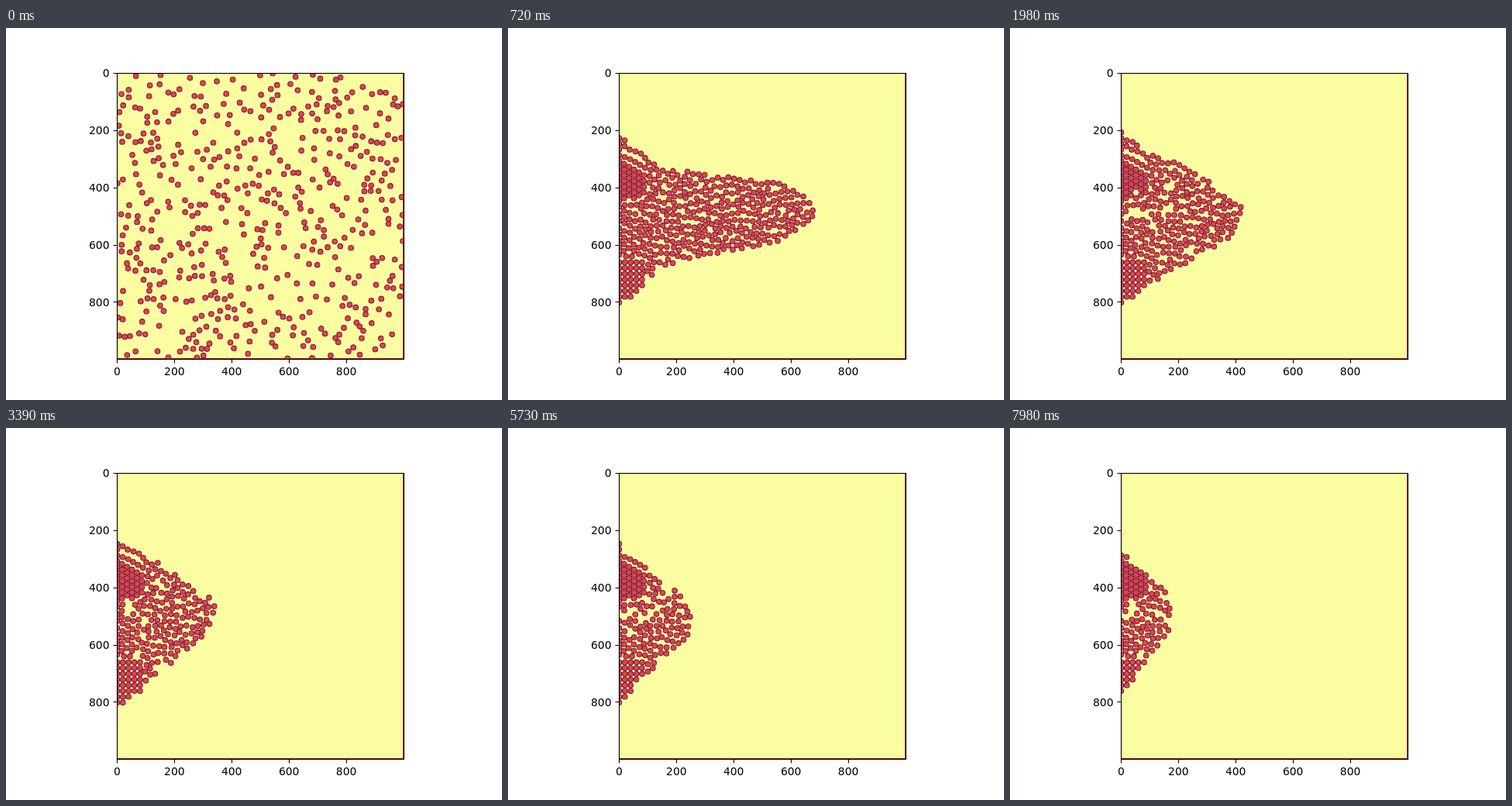
An HTML page that plays this animation: 640x480 px, repeating every 8 s.

```html
<!DOCTYPE html>
<html lang="en">
<head>
<meta charset="utf-8">
<title>Crowd leaving through a door</title>
<style>
  html, body { margin: 0; width: 100%; height: 100%; overflow: hidden; background: #fff; }
  svg { display: block; width: 640px; height: 480px; }
  text { font: 13.89px "DejaVu Sans", sans-serif; }
</style>
</head>
<body>
<svg viewBox="0 0 640 480">
  <defs><clipPath id="room"><rect x="143.5" y="58.5" width="370" height="369"/></clipPath></defs>
  <rect x="143.5" y="58.5" width="370" height="369" fill="#fbfda1"/>
  <path d="M512.5 58V426.5H143" fill="none" stroke="#b01822"/>
  <path id="crowd" clip-path="url(#room)" fill="#e04a38" stroke="#7a1a58" stroke-width="1.1"/>
  <rect x="143.5" y="58.5" width="370" height="369" fill="none" stroke="#000" stroke-width="1.11"/>
  <g id="axes"></g>
</svg>
<script>
const LOOP = 8000, STEP = 30, SETTLED = 24, PEOPLE = 500;
const PACE = 20, DOOR = 500, SCALE = 0.3696, LEFT = 143.2, TOP = 57.6;

// Queue outline: step, length, then upper and lower edge at six even places along it
const OUTLINE = [
  [24, 682, [222, 320, 345, 370, 380, 450], [820, 690, 640, 618, 592, 510]],
  [66, 422, [205, 278, 303, 340, 400, 470], [818, 745, 697, 650, 607, 540]],
  [113, 350, [245, 275, 310, 360, 415, 450], [818, 772, 702, 655, 590, 490]],
  [148, 294, [245, 270, 318, 370, 405, 460], [818, 772, 722, 665, 605, 542]],
  [191, 254, [245, 280, 330, 388, 413, 490], [818, 748, 702, 645, 610, 555]],
  [266, 180, [270, 305, 330, 380, 402, 460], [780, 727, 685, 635, 600, 555]]
];

let seed = 20;
function rand() {
  seed = (seed + 0x6D2B79F5) | 0;
  let t = Math.imul(seed ^ (seed >>> 15), 1 | seed);
  t = (t + Math.imul(t ^ (t >>> 7), 61 | t)) ^ t;
  return ((t ^ (t >>> 14)) >>> 0) / 4294967296;
}
const mix = (a, b, f) => a + (b - a) * f;
const clamp = (v, limit) => Math.max(-limit, Math.min(limit, v));
const reach = p => Math.max(p.x, Math.abs(p.y - DOOR));
const gap = (p, x, y) => Math.hypot(p.x - x, p.y - y);

function inside(x, y, step) {
  let i = 0;
  while (i < OUTLINE.length - 2 && step > OUTLINE[i + 1][0]) i++;
  const a = OUTLINE[i], b = OUTLINE[i + 1];
  const f = (step - a[0]) / (b[0] - a[0]);
  const u = x / mix(a[1], b[1], f) * 5;
  if (u < 0 || u > 5) return false;
  const j = Math.min(4, Math.floor(u));
  const edge = n => mix(mix(a[n][j], a[n][j + 1], u - j), mix(b[n][j], b[n][j + 1], u - j), f);
  return y >= edge(2) && y <= edge(3);
}

// Standing places, grown outwards from the wall
function growSlots() {
  const slots = [];
  const add = (x, y, loose) => slots.push({ x, y, homeX: x, homeY: y, loose });
  const fits = (x, y) => x >= 0 && OUTLINE.some(o => inside(x, y, o[0])) &&
    slots.every(s => gap(s, x, y) >= 19.9);
  for (let y = 208; y < 819; y += 20 + (y > 450 && y < 660 ? rand() * 8 : 0)) add(0, y, false);
  for (let i = 0; i < slots.length; i++) {
    const s = slots[i];
    const square = s.y > 650;
    const loose = s.x > 75 || s.y < 300 || (s.y > 430 && !square);
    for (let j = 0; j < (loose ? 24 : 6); j++) {
      const angle = loose ? rand() * 2 * Math.PI
        : square ? j * Math.PI / 2 : Math.PI / 6 + j * Math.PI / 3;
      const d = loose ? 20 + rand() * 1.5 : 20;
      const x = s.x + d * Math.cos(angle), y = s.y + d * Math.sin(angle);
      if (fits(x, y)) add(x, y, loose);
    }
  }
  return slots;
}

// Random starting places that do not overlap
function scatter() {
  const people = [];
  while (people.length < PEOPLE) {
    const x = rand() * 999, y = rand() * 999;
    if (people.every(p => gap(p, x, y) > 17)) people.push({ x, y });
  }
  return people;
}

// Everyone walks diagonally, then straight, to a free place or out of the door
function sendPeople(slots) {
  const free = new Set(slots.filter(s => inside(s.x, s.y, SETTLED)));
  const people = scatter().sort((a, b) => reach(a) - reach(b));
  const leaving = PEOPLE - free.size;
  people.forEach((p, i) => {
    p.goal = { x: -20, y: DOOR };
    if (i >= leaving) {
      let best = Infinity;
      for (const s of free) {
        const n = Math.max(0, reach(p) - reach(s)), dy = p.y - DOOR;
        const off = gap(s, Math.max(0, p.x - n), p.y - clamp(dy, n));
        const cost = reach(s) + 2 * off;
        if (cost < best) { best = cost; p.goal = s; }
      }
      free.delete(p.goal);
    }
    p.toX = p.goal.x;
    p.toY = p.goal.y;
    p.pace = Math.max(PACE, Math.abs(p.toX - p.x) / SETTLED, Math.abs(p.toY - p.y) / SETTLED);
  });
  return people;
}

function disc(x, y) {
  const px = (LEFT + (x + 0.5) * SCALE - 3.3).toFixed(2);
  const py = (TOP + (y + 0.5) * SCALE).toFixed(2);
  return `M${px} ${py}a3.3 3.3 0 1 0 6.6 0a3.3 3.3 0 1 0-6.6 0z`;
}

function buildSteps() {
  const slots = growSlots(), people = sendPeople(slots), steps = [];
  let holes = [];
  for (let k = 0; k * STEP < LOOP; k++) {
    if (k < SETTLED) {
      steps.push(people.map(p => disc(
        p.x + clamp(p.toX - p.x, p.pace * k),
        p.y + clamp(p.toY - p.y, p.pace * k))).join(""));
      continue;
    }
    // Each departure leaves a hole that travels back through the queue
    const present = slots.filter(s => inside(s.homeX, s.homeY, k));
    const empty = new Set();
    if (k > SETTLED && rand() < 0.7) holes.push({ born: k, angle: (rand() - 0.5) * 2.2 });
    holes = holes.filter(h => {
      const d = PACE * (k - h.born);
      const x = d * Math.cos(h.angle), y = DOOR + d * Math.sin(h.angle);
      if (!inside(x, y, k)) return false;
      const s = present.reduce((a, b) => gap(b, x, y) < gap(a, x, y) ? b : a);
      empty.add(s);
      if (s.loose) {
        s.x = Math.max(0, s.homeX + (rand() - 0.5) * 4);
        s.y = s.homeY + (rand() - 0.5) * 4;
      }
      return true;
    });
    steps.push(present.filter(s => !empty.has(s)).map(s => disc(s.x, s.y)).join(""));
  }
  return steps;
}

function drawAxes() {
  let out = "";
  for (let v = 0; v <= 800; v += 200) {
    const x = LEFT + (v + 0.5) * SCALE, y = TOP + (v + 0.5) * SCALE;
    const tx = Math.round(x) + 0.5, ty = Math.round(y) + 0.5;
    out += `<path d="M${tx} 427.5v5M143.5 ${ty}h-5" stroke="#000" stroke-width="1.11"/>` +
      `<text x="${x}" y="448" text-anchor="middle">${v}</text>` +
      `<text x="133.5" y="${Math.round(y + 5.2)}" text-anchor="end">${v}</text>`;
  }
  document.getElementById("axes").innerHTML = out;
}

drawAxes();
const steps = buildSteps();
const crowd = document.getElementById("crowd");
const start = performance.now();
let shown = -1;
function update() {
  const k = Math.floor((performance.now() - start) % LOOP / STEP);
  if (k !== shown) crowd.setAttribute("d", steps[shown = k]);
  requestAnimationFrame(update);
}
update();
</script>
</body>
</html>
```
